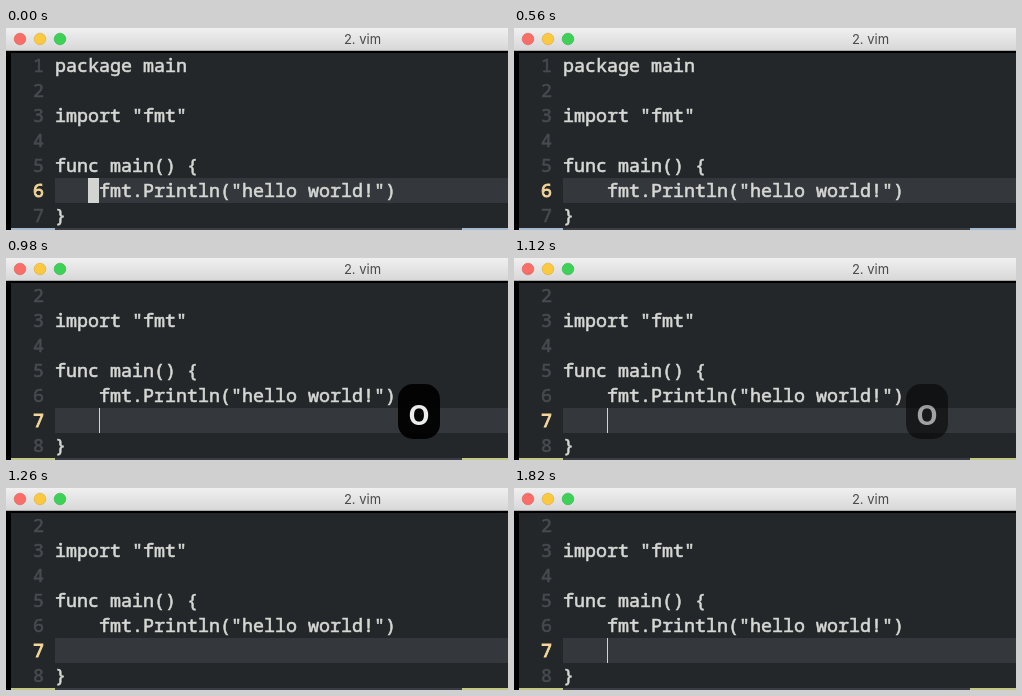
Recreate the animation shown at these times as an HTML page. Size 502 by 202 pixels, loop 1.96 s.

```html
<!DOCTYPE html>
<html lang="en">
<head>
<meta charset="utf-8">
<title>vim</title>
<style>
  html, body { margin: 0; width: 100%; height: 100%; overflow: hidden; background: #000; }
  svg { display: block; width: 502px; height: 202px; }
  .code { font: 500 18.333px "Noto Sans Mono", monospace; fill: #d6d8d4; stroke: #d6d8d4; stroke-width: .6; }
  .num { fill: #474b4f; stroke: #474b4f; }
  .num.on { fill: #f3d79b; stroke: #f3d79b; stroke-width: .9; }
  .title { font: 13px Inter, sans-serif; fill: #4a4a4a; text-anchor: middle; }
  .key { font: 600 36px "Open Sans", sans-serif; fill: #fff; text-anchor: middle; }
</style>
</head>
<body>
<svg viewBox="0 0 502 202">
  <defs>
    <linearGradient id="bar" x2="0" y2="1">
      <stop offset="0" stop-color="#f0f0f0"/>
      <stop offset="1" stop-color="#d8d8d8"/>
    </linearGradient>
  </defs>
  <rect width="502" height="202" fill="#000"/>
  <rect width="502" height="22" fill="url(#bar)"/>
  <rect y="22" width="502" height="1" fill="#a8a8a8"/>
  <g stroke-width=".6">
    <circle cx="14" cy="11" r="5.8" fill="#f96e67" stroke="#dc5a54"/>
    <circle cx="34" cy="11" r="5.8" fill="#fac93f" stroke="#dca936"/>
    <circle cx="54" cy="11" r="5.8" fill="#3ed157" stroke="#30b045"/>
  </g>
  <text class="title" x="356.5" y="15.5">2. vim</text>

  <rect x="5" y="25" width="497" height="177" fill="#23272a"/>
  <rect x="49" y="150" width="453" height="25" fill="#34373c"/>
  <g id="before" class="code"></g>
  <g id="after" class="code"></g>
  <rect id="cursor" y="150" height="25" fill="#d2d4d2"/>

  <rect x="5" y="200" width="451" height="2" fill="#3a3d43"/>
  <g id="mode">
    <rect x="5" y="200" width="44" height="2"/>
    <rect x="456" y="200" width="46" height="2"/>
  </g>

  <g id="badge">
    <rect x="392" y="126" width="42" height="55" rx="15" fill="#000"/>
    <text class="key" x="413" y="167">o</text>
  </g>
</svg>
<script>
const LOOP = 1960, TICK = 70, BLINK = 560;
const CELL = 11, ROW = 25, LEFT = 49;
const $ = id => document.getElementById(id);

const source = ['package main', '', 'import "fmt"', '', 'func main() {',
                '\tfmt.Println("hello world!")', '}'];
const opened = [...source.slice(0, 6), '', '}'];

function addText(parent, cls, x, y, str) {
  const el = document.createElementNS('http://www.w3.org/2000/svg', 'text');
  el.setAttribute('class', cls);
  el.setAttribute('x', x);
  el.setAttribute('y', y);
  el.textContent = str;
  parent.append(el);
}

function addLines(parent, lines, first, current) {
  for (let n = first; n <= lines.length; n++) {
    const y = 44 + ROW * (n - first), line = lines[n - 1];
    addText(parent, n === current ? 'num on' : 'num', LEFT - 2 * CELL, y, n);
    const indent = line.startsWith('\t') ? 4 : 0;
    if (line) addText(parent, '', LEFT + indent * CELL, y, line.trim());
  }
}

addLines($('before'), source, 1, 6);
addLines($('after'), opened, 2, 7);

const show = (id, on) => $(id).setAttribute('visibility', on ? 'visible' : 'hidden');

function draw(ms) {
  const t = Math.floor(ms % LOOP / TICK) * TICK;
  const isOpen = t >= 630, insert = t >= 700;

  show('before', !isOpen);
  show('after', isOpen);

  // The block covers the last cell of the tab; the insert bar is one pixel.
  show('cursor', Math.floor((t + BLINK - 140) / BLINK) % 2 === 0);
  $('cursor').setAttribute('x', insert ? 93 : 82);
  $('cursor').setAttribute('width', insert ? 1 : CELL);

  $('mode').setAttribute('fill', insert ? '#c3c884' : '#a3b9d0');

  const fade = Math.min(1, Math.max(0, (t - 910) / 350));
  $('badge').setAttribute('opacity', isOpen ? 1 - fade ** 1.5 : 0);
}

const start = performance.now();
function loop() {
  draw(performance.now() - start);
  requestAnimationFrame(loop);
}
loop();
</script>
</body>
</html>
```
